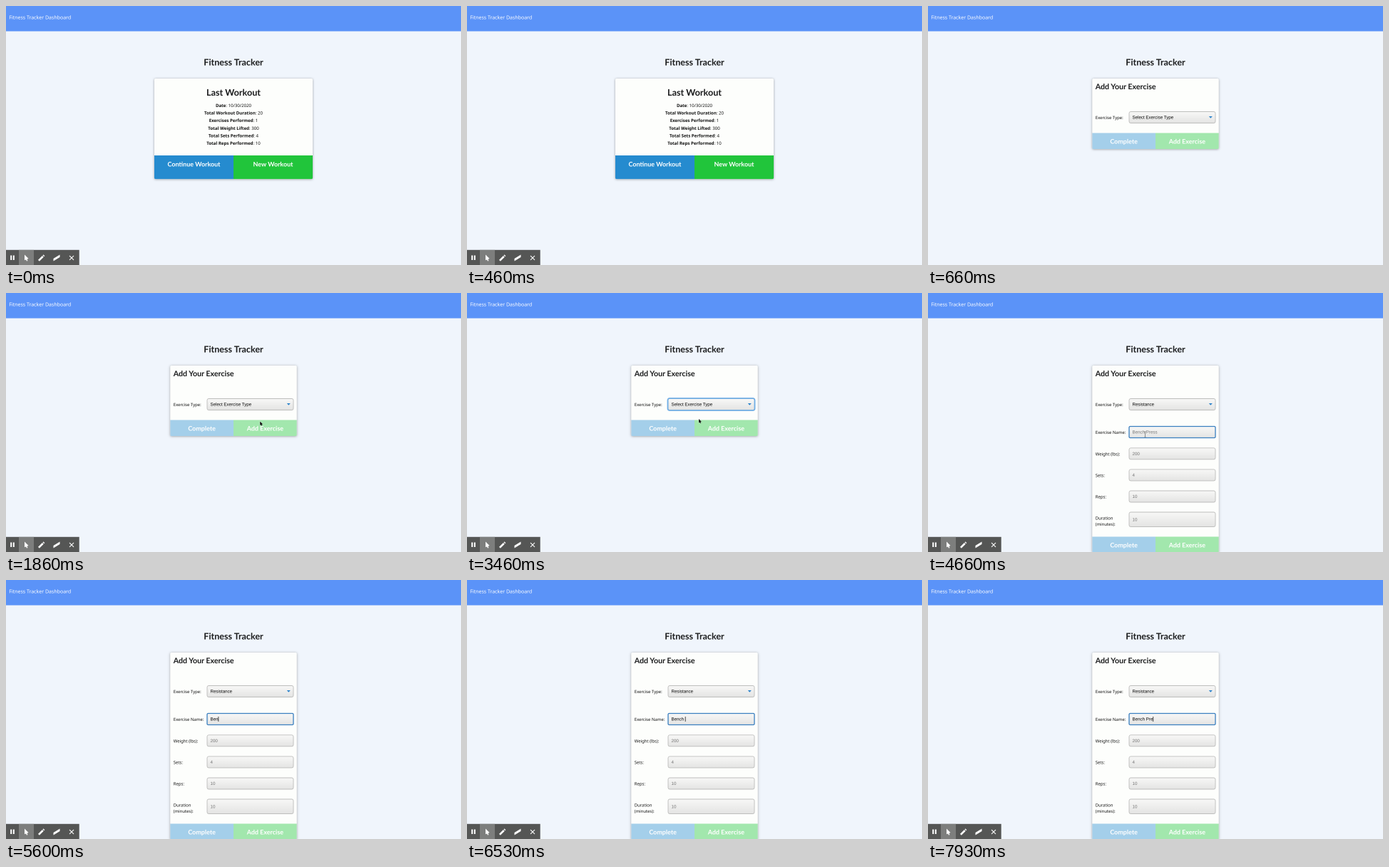
These frames come from a looping animation (638 by 364 pixels, 8 s). An HTML page with a canvas:

```html
<!DOCTYPE html>
<html lang="en">
<head>
<meta charset="utf-8">
<title>Fitness Tracker Dashboard</title>
<style>
html, body { margin: 0; width: 100%; height: 100%; overflow: hidden; background: #f0f5fc; }
canvas { display: block; width: 638px; height: 364px; }
</style>
</head>
<body>
<canvas id="stage"></canvas>
<script>
const W = 638, H = 364, LOOP = 8000;
const canvas = document.getElementById('stage');
const ctx = canvas.getContext('2d');
// Oversampling keeps the very small type smooth
const scale = 2 * (window.devicePixelRatio || 1);
canvas.width = W * scale;
canvas.height = H * scale;

const LATO = 'Lato, sans-serif', NOTO = '"Noto Sans", sans-serif';
const LABEL = '5.95px ' + NOTO;
const FIELD = '6.2px "Liberation Sans", Arial, sans-serif';
const INK = '#1b1c1d', HINT = '#757575';

// Milliseconds at which the user acts
const AT = { form: 660, toolbar: 800, pointer: 1400, open: 2130, choose: 3600, focus: 4400, type: 4730 };
const KEY_DELAY = 360;
const START = { x: 374, y: 218 };
const MOVES = [
  { from: AT.pointer, to: 2150, x: 345, y: 157 },
  { from: 3060, to: 3460, x: 325, y: 177 },
  { from: 3860, to: 4350, x: 304, y: 198 }
];

function text(str, x, y, font, color = INK, align = 'left') {
  ctx.font = font;
  ctx.fillStyle = color;
  ctx.textAlign = align;
  ctx.fillText(str, x, y);
}

function textWidth(str, font) {
  ctx.font = font;
  return ctx.measureText(str).width;
}

function rect(x, y, w, h, color) {
  ctx.fillStyle = color;
  ctx.fillRect(x, y, w, h);
}

function outline(x, y, w, h, radius, color, width) {
  ctx.beginPath();
  ctx.roundRect(x, y, w, h, radius);
  ctx.strokeStyle = color;
  ctx.lineWidth = width;
  ctx.stroke();
}

function shape(points, color) {
  ctx.beginPath();
  points.forEach(([x, y]) => ctx.lineTo(x, y));
  ctx.closePath();
  ctx.fillStyle = color;
  ctx.fill();
}

function line(x1, y1, x2, y2, color, width) {
  ctx.beginPath();
  ctx.moveTo(x1, y1);
  ctx.lineTo(x2, y2);
  ctx.strokeStyle = color;
  ctx.lineWidth = width;
  ctx.stroke();
}

function arrow(x, y, size, color) {
  const s = size / 8;
  shape([[x, y], [x, y + 7 * s], [x + 5 * s, y + 5 * s]], color);
  line(x + 1.8 * s, y + 4.5 * s, x + 3.4 * s, y + size, color, 1.4 * s);
}

// A centred card with two equal buttons along its bottom edge
function card(w, bottom, buttonY, textY, labels, alpha) {
  const x = (W - w) / 2, y = 102;
  ctx.save();
  ctx.shadowColor = 'rgba(0,0,0,.36)';
  ctx.shadowBlur = 3 * scale;
  ctx.shadowOffsetY = 0.5 * scale;
  ctx.beginPath();
  ctx.roundRect(x, y, w, bottom - y, 2);
  ctx.fillStyle = '#fdfefc';
  ctx.fill();
  ctx.restore();
  ctx.save();
  ctx.clip();
  ctx.globalAlpha = alpha;
  rect(x, buttonY, w / 2, bottom - buttonY, '#258bcf');
  rect(W / 2, buttonY, w / 2, bottom - buttonY, '#21c53b');
  ctx.restore();
  labels.forEach((label, i) =>
    text(label, x + w * (0.25 + i / 2), textY, '700 8.95px ' + LATO, '#fff', 'center'));
}

function field(y, h, value, color, focused) {
  const fill = ctx.createLinearGradient(0, y, 0, y + h);
  fill.addColorStop(0, '#f8f8f7');
  fill.addColorStop(1, '#e4e4e3');
  rect(282, y, 121, h, fill);
  if (focused) outline(282, y, 121, h, 1.5, '#3a7fc0', 1.3);
  else outline(282, y, 121, h, 2.5, '#bdbdbc', 0.9);
  text(value, 286.5, y + h / 2 + 2.2, FIELD, color);
}

function lastWorkout() {
  card(222, 243.3, 210, 225.3, ['Continue Workout', 'New Workout'], 1);
  text('Last Workout', W / 2, 126, '700 12.6px ' + LATO, INK, 'center');
  const workout = {
    'Date': '10/30/2020', 'Total Workout Duration': 20, 'Exercises Performed': 1,
    'Total Weight Lifted': 300, 'Total Sets Performed': 4, 'Total Reps Performed': 10
  };
  const plain = '6.1px ' + NOTO, bold = '700 ' + plain;
  Object.entries(workout).forEach(([name, value], i) => {
    const y = 141.9 + i * 10.66, rest = ': ' + value;
    const nameWidth = textWidth(name, bold);
    const x = (W - nameWidth - textWidth(rest, plain)) / 2;
    text(name, x, y, bold, '#111');
    text(rest, x + nameWidth, y, plain, '#111');
  });
}

function nameField(t) {
  const typed = Math.max(0, Math.ceil((t - AT.type) / KEY_DELAY));
  const name = 'Bench Press', value = typed ? name.slice(0, typed) : name;
  field(187.5, 16, value, typed ? '#000' : HINT, t >= AT.focus);
  if (typed) {
    const x = 286.9 + textWidth(value, FIELD);
    line(x, 192, x, 199, '#000', 0.7);
  }
}

function exerciseForm(t) {
  const chosen = t >= AT.choose;
  const buttonY = chosen ? 342.5 : 178.5;
  card(177.5, buttonY + 22.5, buttonY, buttonY + 14.8, ['Complete', 'Add Exercise'], 0.41);
  text('Add Your Exercise', 234.7, 117, '700 10.66px ' + LATO);

  const label = (str, y) => text(str, 234.8, y, LABEL, '#111');
  label('Exercise Type:', 159);
  field(148.5, 16, chosen ? 'Resistance' : 'Select Exercise Type', '#000');
  if (t >= AT.open && t < AT.focus) outline(281.5, 148, 122, 17, 2.5, '#70aee6', 1.8);
  shape([[393.8, 155], [398.8, 155], [396.3, 157.8]], '#2b82cb');
  if (!chosen) return;

  label('Exercise Name:', 198.2);
  nameField(t);
  [['Weight (lbs):', '200'], ['Sets:', '4'], ['Reps:', '10']].forEach(([str, hint], i) => {
    label(str, 228.3 + i * 30.1);
    field(217.8 + i * 30.1, 16, hint, HINT);
  });
  label('Duration', 318.6);
  label('(minutes):', 327);
  field(308, 20.5, '10', HINT);
}

function pointer(t) {
  if (t < AT.pointer || t >= AT.type) return;
  let { x, y } = START;
  for (const move of MOVES) {
    const k = Math.min(1, Math.max(0, (t - move.from) / (move.to - move.from)));
    x += (move.x - x) * k;
    y += (move.y - y) * k;
  }
  if (t >= AT.choose && y > 187) {
    line(x + 0.5, y - 3, x + 0.5, y + 4, '#666', 0.7);
    for (const end of [-3.2, 4.2]) line(x - 0.7, y + end, x + 1.7, y + end, '#777', 0.6);
  } else {
    arrow(x - 0.4, y - 0.7, 7, 'rgba(255,255,255,.7)');
    arrow(x, y, 6, '#111');
  }
}

function toolbar() {
  const top = 342.8, white = '#fff';
  rect(0, top, 102.7, H - top, '#555655');
  rect(18, top, 21, H - top, '#7d7e7d');
  for (const x of [7.2, 10.8]) line(x, 350.5, x, 357, white, 2);
  arrow(26, 349.5, 8.8, white);
  line(45.9, 357.8, 51.8, 351.9, white, 2.6);
  line(52.4, 351.3, 53.4, 350.3, white, 2.6);
  shape([[66.5, 355], [75.5, 349.5], [75.5, 353], [66.5, 358.5]], white);
  line(89, 351, 95, 357, white, 1.1);
  line(95, 351, 89, 357, white, 1.1);
}

function draw(now) {
  const t = now % LOOP;
  ctx.setTransform(scale, 0, 0, scale, 0, 0);
  ctx.textRendering = 'geometricPrecision';
  rect(0, 0, W, H, '#f0f5fc');
  rect(0, 0, W, 35.5, '#5b93f8');
  text('Fitness Tracker Dashboard', 4.2, 18.6, '7px ' + NOTO, '#fff');
  text('Fitness Tracker', W / 2, 83.6, '700 12.55px ' + LATO, INK, 'center');
  if (t < AT.form) lastWorkout();
  else exerciseForm(t);
  if (t < AT.form || t >= AT.toolbar) toolbar();
  pointer(t);
  requestAnimationFrame(draw);
}
requestAnimationFrame(draw);
</script>
</body>
</html>
```
